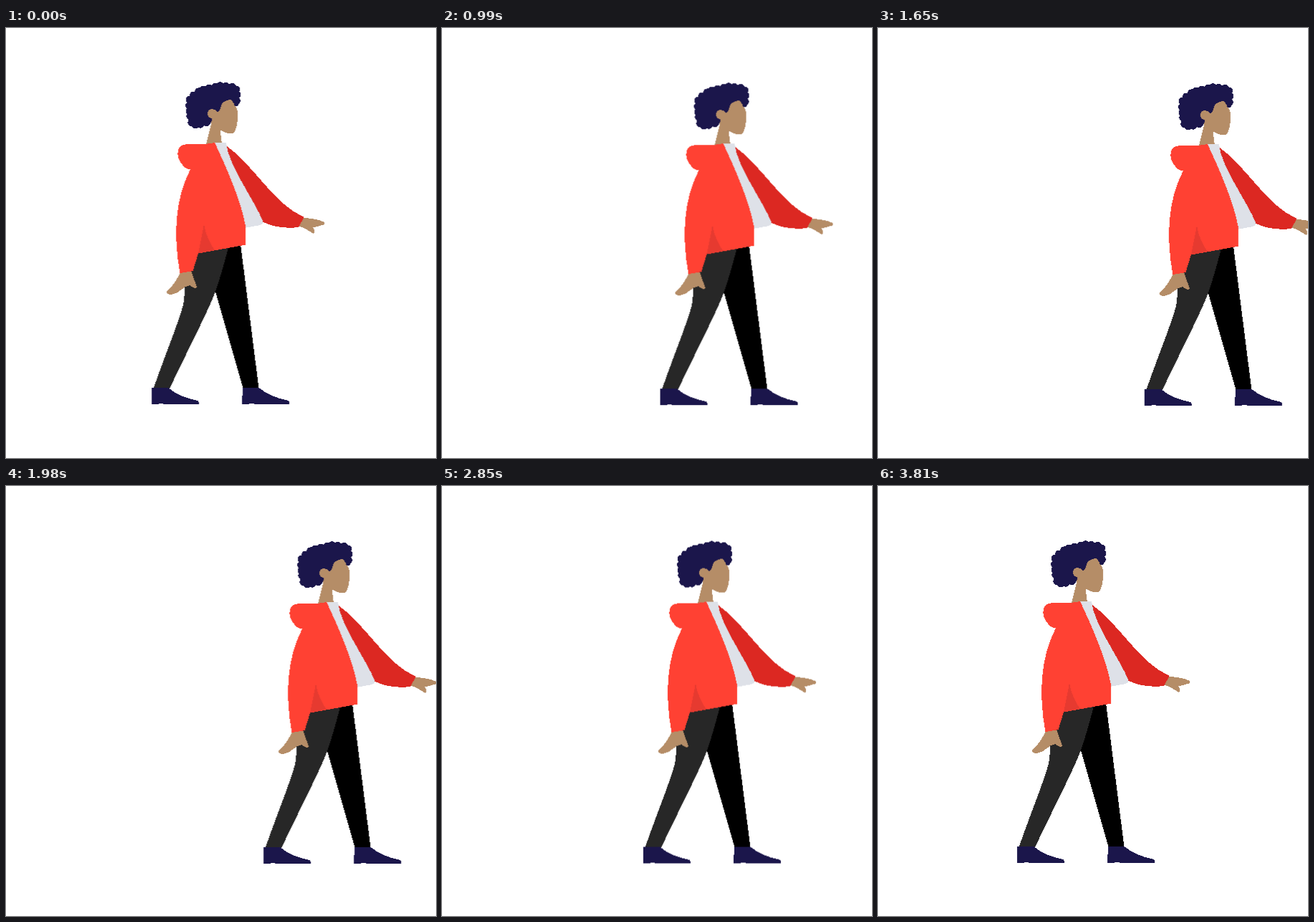
Recreate the animation shown at these times as an HTML page. Size 600 px wide and 600 px high, loop 3.87 s.

```html
<!DOCTYPE html>
<html lang="en">
<head>
<meta charset="utf-8">
<title>Strolling figure</title>
<style>
  html, body { margin: 0; width: 100%; height: 100%; overflow: hidden; background: #fff; }
  svg { display: block; width: 100%; height: 100%; }
  .skin { fill: #b58d67; }
  .navy { fill: #1b164b; }
  .curls { stroke: #1b164b; stroke-width: 11; stroke-linecap: round; stroke-dasharray: 0 8 0 9 0 7; }
  .figure { shape-rendering: crispEdges; animation: glide 3870ms infinite; }
  /* One step every 30 ms, with a short rest at the end */
  @keyframes glide {
    0% { transform: translate(.3px, 0); animation-timing-function: steps(58); }
    44.9612% { transform: translate(178px, 2.1px); animation-timing-function: steps(69); }
    98.4496%, 100% { transform: translate(-8.9px, 1px); }
  }
</style>
</head>
<body>
<svg viewBox="0 0 600 600">
  <defs>
    <path id="shoe" class="navy" d="M203.500 502H226C238 512 253 517 267 520Q269 521 269 525H222L214 523.500L212 525H202.500Z"/>
  </defs>
  <g class="figure">
    <!-- Legs and shoes -->
    <path d="M300 300L327 302L352.500 503H330.500L291.500 366Z"/>
    <path fill="#272727" d="M262 310L310 306Q302 338 292.500 366C286 386 263 430 228 503H205.500C222 455 247 395 248 380L250 355Z"/>
    <use href="#shoe"/>
    <use href="#shoe" x="126.500"/>

    <!-- Far arm -->
    <path class="skin" d="M414 264.500C424 266 434 266 443 270.500Q446 273 443 274.500C438 276 433 277 428 278.500Q430 281 430 285Q430 288 427 286Q420 281 408 276Z"/>
    <path fill="#dc2822" d="M306 163.500C345 190 372 245 415.500 264L408 278C390 280 372 278 357 270L320 215Z"/>

    <!-- Head -->
    <path class="navy curls" d="M256 100Q265 88 279 85L300 80.500L318 82.500L323 89L321 96L321.500 106L314 100L302 103L298 112L282 130L276 133.500L260 135.500L257.500 128L255.500 112Z"/>
    <path class="skin" d="M312.500 99.500C305 102 301 104 300 108C299 114 297 118 294 117C291 111 281 112 281 119C281 124 284 126 287 126L286 134L279 162H301L298.500 142C304 146 311 148 317 147C321 144 323 132 323 122C323 116 322.500 113 320.500 110C317 108 319 104 312.500 99.500Z"/>

    <!-- Shirt, near hand, jacket -->
    <path fill="#dee1e8" d="M289 160H307C309 190 345 238 358.500 270Q359 274 352 275.500L332 279Z"/>
    <path class="skin" d="M243 341L258 338C260 347 264 354 266 361C265 366 259 361 256 359C247 360 241 371 231 372C224 372 222 369 226 365C233 360 238 351 243 341Z"/>
    <path fill="#ff4133" d="M291 160C305 190 328 240 334.500 279L334 302.500L268 314.500L260.500 339L242.500 342C233 290 235 240 257 197Q250 197 246 191C238 183 236 167 247 163Q254 161.500 278 162Z"/>
    <path fill="#e63a30" d="M276 274C278 288 284 300 291 310L268 314.500Z"/>
  </g>
</svg>
</body>
</html>
```
